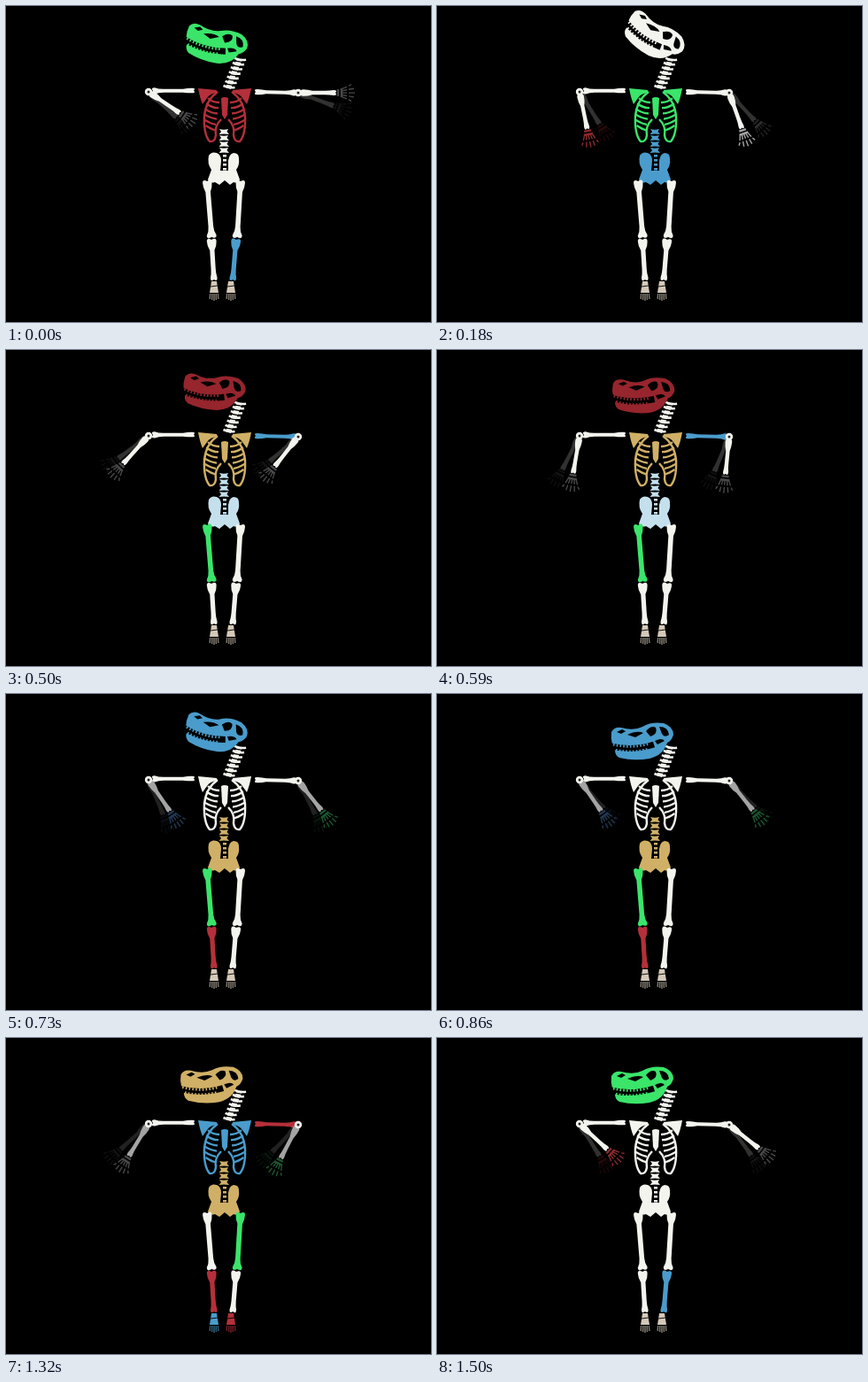
These frames come from a looping animation (480 px wide and 357 px high, 1.55 s). An HTML page with a canvas:

```html
<!DOCTYPE html>
<html>
<head>
<meta charset="utf-8">
<style>
html, body { margin: 0; height: 100%; overflow: hidden; background: #000; }
canvas { display: block; width: 100vw; height: 100vh; }
</style>
</head>
<body>
<canvas id="stage" width="480" height="357"></canvas>
<script>
const ctx = document.getElementById('stage').getContext('2d');
const LOOP = 1550, STEPS = 34, STEP = 1000 / 22, TURN = Math.PI * 2;

const palette = {
  W: '#f4f4ef', G: '#3ae56a', R: '#b4303a', B: '#4a9ccc', L: '#c4e0ec', Y: '#d0b066',
  l: '#7fb2d0', d: '#96252d', T: '#d4c8b8', S: '#a4a4a4',
  k: '#484848', r: '#8a2a2c', b: '#223a52', g: '#1e5530'
};

// One colour letter per lighting cue; cues switch abruptly.
const colors = {
  head: 'GWdBlYG', ribs: 'RGYWLBW', hips: 'WBLYYYW', spine: 'WBLYYYW',
  humerusL: 'WWWWWWW', humerusR: 'WWBWRRW', forearmL: 'WWWSSSW', forearmR: 'WWWSSSW',
  handL: 'krkbbkr', handR: 'kSkgggk',
  femurL: 'WWGGWWW', femurR: 'WWWWGGW', tibiaL: 'WWWRWRW', tibiaR: 'BWWWTWB',
  footL: 'TTTTkBT', footR: 'TTTTRRT'
};

const shapes = {
  skull: 'M197 43Q200 37 208 38Q222 42 232 37Q242 31 256 33Q267 37 267 46Q265 53 260 55Q256 69 240 73Q222 76 206 72Q201 69 201 64L198 57Q196 50 197 43Z',
  sockets: 'M236 42Q242 35 247 38Q250 45 241 48ZM251 37Q261 37 262 46Q257 50 254 45ZM203 43l6-3 4 2-5 3ZM215 46Q226 41 233 44L224 49ZM246 53Q254 49 257 53L249 57Z',
  pelvis: 'M229 169Q232 164 238 166Q243 168 243 175L242 186H251L251 175Q252 167 257 166Q263 166 263 172Q264 180 260 185L264 196Q262 201 257 199L253 202L247 197L241 202L236 199Q230 201 228 196L232 185Q227 178 229 169Z',
  scapula: 'M9 95L30 93Q28 104 25 111L20 104Q17 99 9 98Z',
  sternum: 'M243 104Q247 102 251 104L250 123L247 128L244 123Z'
};
for (const name in shapes) shapes[name] = new Path2D(shapes[name]);

function fill(shape, color) {
  ctx.fillStyle = color;
  ctx.fill(shape);
}

function stroke(path, color, width, dash = []) {
  ctx.strokeStyle = color;
  ctx.lineWidth = width;
  ctx.setLineDash(dash);
  ctx.stroke(new Path2D(path));
}

function dot(x, y, r, color) {
  ctx.fillStyle = color;
  ctx.beginPath();
  ctx.arc(x, y, r, 0, TURN);
  ctx.fill();
}

function placed(x, y, angle, draw) {
  ctx.save();
  ctx.translate(x, y);
  ctx.rotate(angle);
  draw();
  ctx.restore();
}

// Long bone with half widths: a at the start, w along the shaft, b at the end.
function bone(x1, y1, x2, y2, a, w, b, color) {
  const n = Math.hypot(x2 - x1, y2 - y1);
  placed(x1, y1, Math.atan2(y2 - y1, x2 - x1), () => {
    fill(new Path2D(`M2 0Q-1 ${-a} 4 ${-a}Q9 ${-a} 14 ${-w}H${n - 14}Q${n - 8} ${-w} ${n - 4} ${-b}
      Q${n + 1} ${-b} ${n - 2} 0Q${n + 1} ${b} ${n - 4} ${b}Q${n - 8} ${w} ${n - 14} ${w}
      H14Q9 ${a} 4 ${a}Q-1 ${a} 2 0Z`), color);
  });
}

function hand(color) {
  stroke('M45 -4V4M49 -5V5', color, 2.4);
  for (let i = -2; i <= 2; i++) {
    stroke(`M48 ${i * 2}L55 ${i * 3.4}M57 ${i * 3.8}L${64 - i * i} ${i * 4.8}`, color, 1.4);
  }
}

function forearm(x, y, angle, trail, boneColor, handColor) {
  const draw = () => {
    bone(2, 0, 44, 0, 3.8, 2.2, 3, boneColor);
    hand(handColor);
  };
  ctx.globalAlpha = .2;
  placed(x, y, trail, draw);
  ctx.globalAlpha = 1;
  placed(x, y, angle, draw);
  dot(x, y, 4.2, palette.W);
  dot(x, y, 1.5, '#222');
}

function ribcage(color) {
  for (const side of [-1, 1]) {
    ctx.save();
    ctx.translate(247, 0);
    ctx.scale(side, 1);
    fill(shapes.scapula, color);
    stroke('M8 97Q21 106 23 124Q24 145 17 153Q11 154 10 146Q12 136 4 128', color, 2.4);
    for (let i = 0; i < 6; i++) {
      const y = 104 + i * 6.2;
      stroke(`M${19 + Math.sin(i / 2) * 4} ${y}Q14 ${y + 5} ${6 + i} ${y + 5}`, color, 2.3);
    }
    ctx.restore();
  }
  fill(shapes.sternum, color);
}

function neck() {
  stroke('M251 93Q256 78 264 60', palette.W, 6);
  for (let i = 0; i < 7; i++) {
    const x = 251.5 + i * 2.1, y = 92 - i * 5.2;
    stroke(`M${x - 6} ${y - 2}Q${x} ${y + 1} ${x + 7} ${y}`, palette.W, 2.6);
    stroke(`M${x - 4} ${y - 4.2}L${x + 6} ${y - 2.4}`, '#000', 1.3);
  }
}

function spine(color) {
  for (let y = 139; y < 165; y += 7) {
    fill(new Path2D(`M241 ${y}Q246 ${y + 1.5} 251 ${y}L249.5 ${y + 3}L252 ${y + 6}Q246 ${y + 5} 240.5 ${y + 6}L243 ${y + 3}Z`), color);
  }
}

function foot(x, color) {
  fill(new Path2D(`M${x - 3} 311H${x + 3}L${x + 5} 324H${x - 5}Z`), color);
  stroke(`M${x - 4} 317L${x + 4} 316`, '#000', .9);
  ctx.globalAlpha = .6;
  for (let i = -2; i <= 2; i++) {
    stroke(`M${x + i * 2.2} 325L${x + i * 2.4} ${333 - Math.abs(i)}`, color, 1.5);
  }
  ctx.globalAlpha = 1;
}

function skull(tilt, color) {
  placed(264, 63, tilt, () => {
    ctx.translate(-264, -63);
    fill(shapes.skull, color);
    fill(shapes.sockets, '#000');
    stroke('M196 59Q220 65 245 57', '#000', 7);
    stroke('M199 57Q220 62 240 56', color, 3, [1.6, 2.2]);
    stroke('M202 63Q220 67 238 62', color, 2.5, [1.6, 2.2]);
  });
}

const rad = degrees => degrees * Math.PI / 180;

// Two swings per loop, the second one weaker.
function leftAngle(k) {
  const reach = 54 + 8 * Math.cos(TURN * k / STEPS);
  return rad(95 - reach * Math.cos(TURN * (k / 17 - .03)));
}

// Follows the left arm after starting from fully stretched.
const rightAngle = k => leftAngle(k) - rad(4 + 30 * Math.exp(-Math.abs(k) / 2));

// One big toss of the head, then short nods.
function headTilt(k) {
  const toss = 39 * Math.exp(-(((k - 4.8) / 5.6) ** 2));
  const nod = 18 * Math.cos(TURN * (k - 16) / 10.5);
  return rad(Math.max(toss, k > 10 ? nod : 0));
}

function draw(now) {
  const k = Math.floor(now % LOOP / STEP + .1) % STEPS;
  const cue = Math.floor((k * STEP + 75) / 255);
  const c = {};
  for (const part in colors) c[part] = palette[colors[part][cue]];

  ctx.fillStyle = '#000';
  ctx.fillRect(0, 0, 480, 357);
  neck();
  bone(214, 95.5, 164, 96, 2.8, 2, 3.6, c.humerusL);
  bone(280, 97, 329, 98, 3.2, 2, 3.6, c.humerusR);
  ribcage(c.ribs);
  forearm(161, 97, leftAngle(k), leftAngle(k - 1), c.forearmL, c.handL);
  forearm(330, 98, rightAngle(k), rightAngle(k - 1), c.forearmR, c.handR);
  spine(c.spine);
  fill(shapes.pelvis, c.hips);
  stroke('M247 168V187', c.hips, 4, [2.5, 2.5]);
  bone(227, 196, 232.5, 263, 5.2, 2.8, 5.4, c.femurL);
  bone(265, 196, 261, 263, 5.2, 2.8, 5.4, c.femurR);
  bone(232, 262, 235, 311, 5.4, 2.6, 3.8, c.tibiaL);
  bone(260, 262, 256, 311, 5.4, 2.6, 3.8, c.tibiaR);
  foot(235, c.footL);
  foot(254, c.footR);
  skull(headTilt(k), c.head);
}

function tick() {
  draw(performance.now());
  requestAnimationFrame(tick);
}
tick();
</script>
</body>
</html>
```
